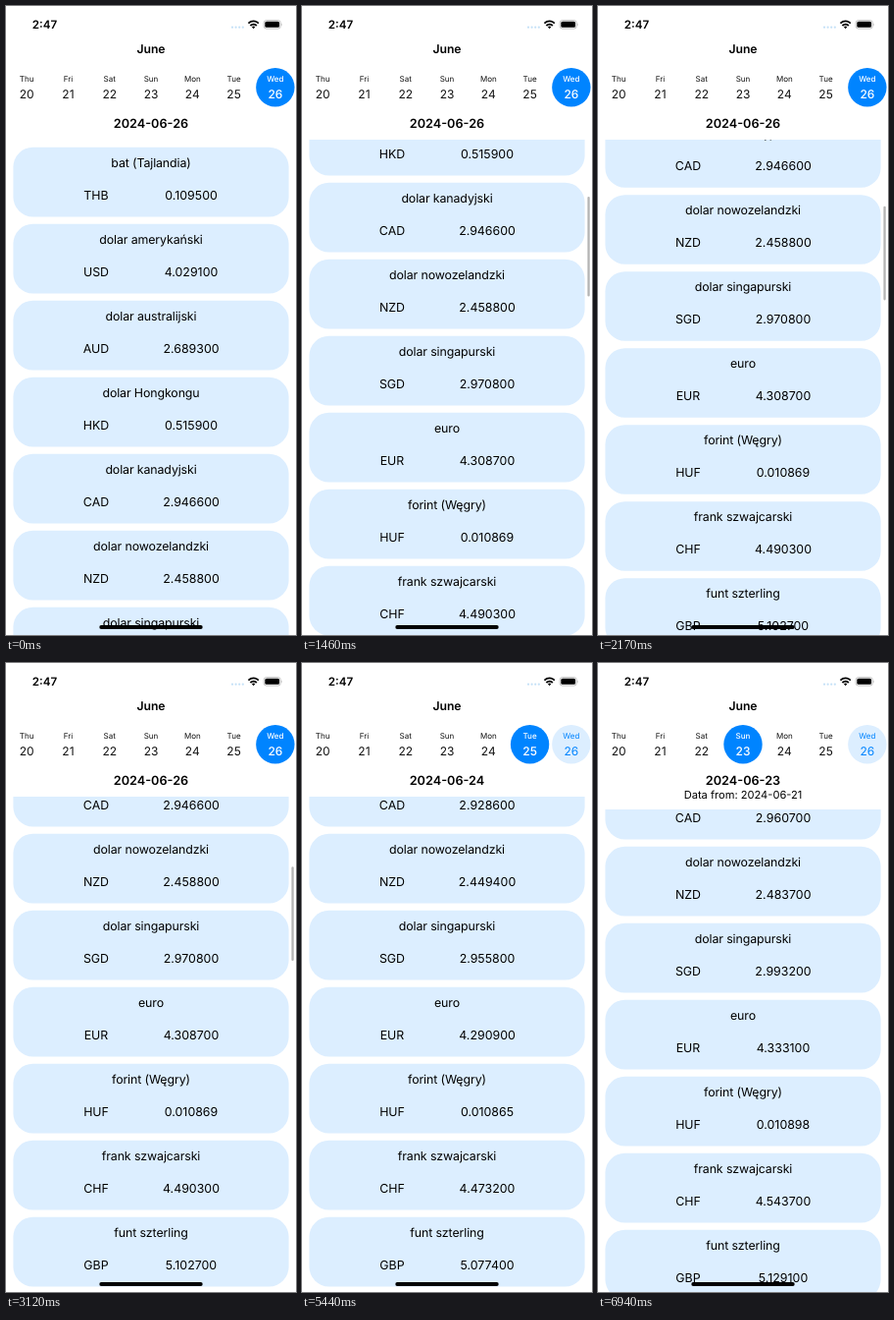
These frames come from a looping animation (296x640 px, 8000 ms). An HTML page:

```html
<!DOCTYPE html>
<html lang="en">
<head>
<meta charset="utf-8">
<title>Exchange rates</title>
<style>
  html, body { margin: 0; width: 100%; height: 100%; overflow: hidden; background: #fff; }
  svg { display: block; width: 100%; height: 100%; }
  text {
    font-family: Inter, Roboto, sans-serif; font-size: 12.4px; text-anchor: middle;
    fill: #000; text-rendering: geometricPrecision;
  }
  .bold { font-weight: 600; }
  .title { letter-spacing: -.12px; }
  .name { font-size: 8px; }
  .num { font-size: 12px; }
</style>
</head>
<body>
<svg id="stage" viewBox="0 0 296 640">
  <defs>
    <clipPath id="view"><rect id="viewRect" width="296" height="640"/></clipPath>
  </defs>
  <rect width="296" height="640" fill="#fff"/>
  <g clip-path="url(#view)"><g id="list"></g></g>
  <rect id="bar" x="291.4" width="2.3" rx="1.15" fill="#b4b4b4"/>

  <text class="bold" x="39.5" y="23" style="font-size:11.6px">2:47</text>
  <g fill="#c5e1f7">
    <circle cx="231" cy="21.7" r="1.1"/><circle cx="234.6" cy="21.7" r="1.1"/>
    <circle cx="238.2" cy="21.7" r="1.1"/><circle cx="241.8" cy="21.7" r="1.1"/>
  </g>
  <g fill="none" stroke="#000" stroke-width="1.8">
    <path d="M247.4 17.6a7.4 7.4 0 0 1 10.4 0"/>
    <path d="M249.4 20a4.6 4.6 0 0 1 6.4 0"/>
  </g>
  <path d="M250.9 21.3a2.4 2.4 0 0 1 3.4 0l-1.7 1.9z"/>
  <rect x="263.1" y="14.6" width="17.2" height="8.4" rx="2.6" fill="none" stroke="#b0b0b0" stroke-width=".8"/>
  <rect x="264.3" y="15.8" width="14.8" height="6" rx="1.6"/>
  <path d="M281.2 17.4q1.3 1.4 0 2.8z" fill="#b0b0b0"/>

  <text class="bold" x="148" y="48" style="font-size:12.2px">June</text>
  <g id="week"></g>
  <text id="date" class="bold" x="148" y="123.5" style="font-size:12.7px"></text>
  <text id="note" x="148" y="138" style="font-size:11.1px">Data from: 2024-06-21</text>
  <rect x="95.3" y="630.1" width="105.4" height="3.8" rx="1.9"/>
</svg>
<script>
const LOOP = 8000, PITCH = 78, LIST_TOP = 143.8, TODAY = 26;
const BLUE = '#0084ff', PALE = '#dceeff';

const currencies = [
  ['bat (Tajlandia)', 'THB'], ['dolar amerykański', 'USD'], ['dolar australijski', 'AUD'],
  ['dolar Hongkongu', 'HKD'], ['dolar kanadyjski', 'CAD'], ['dolar nowozelandzki', 'NZD'],
  ['dolar singapurski', 'SGD'], ['euro', 'EUR'], ['forint (Węgry)', 'HUF'],
  ['frank szwajcarski', 'CHF'], ['funt szterling', 'GBP']
];
const firstRates = [0.1095, 4.0291, 2.6893, 0.5159];
// Rates from CAD onward for each day.
const rates = {
  26: [2.9466, 2.4588, 2.9708, 4.3087, 0.010869, 4.4903, 5.1027],
  25: [2.9286, 2.4494, 2.9558, 4.2909, 0.010865, 4.4732, 5.0774],
  24: [2.9447, 2.4665, 2.9745, 4.3120, 0.010882, 4.5084, 5.1032],
  23: [2.9607, 2.4837, 2.9932, 4.3331, 0.010898, 4.5437, 5.1291]
};
const taps = [[3950, 25], [5440, 24], [6620, 23]];
const ticks = [0, 500, 610, 730, 850, 980, 1090, 1210, 1320, 1460, 1570, 1690, 1810,
  1930, 2050, 2170, 2280, 2400, 2530, 2690, 2990, 3120];

const $ = id => document.getElementById(id);
function add(parent, tag, attrs, content = '') {
  const el = document.createElementNS('http://www.w3.org/2000/svg', tag);
  for (const key in attrs) el.setAttribute(key, attrs[key]);
  el.textContent = content;
  return parent.appendChild(el);
}

const values = currencies.map(([name, code], i) => {
  const y = LIST_TOP + i * PITCH;
  add($('list'), 'rect', { x: 7.4, y, width: 281.2, height: 70.6, rx: 20, fill: PALE });
  add($('list'), 'text', { x: 148, y: y + 20, class: 'title' }, name);
  add($('list'), 'text', { x: 92, y: y + 52.8 }, code);
  return add($('list'), 'text', { x: 189, y: y + 52.8 });
});

const days = ['Thu', 'Fri', 'Sat', 'Sun', 'Mon', 'Tue', 'Wed'].map((name, i) => {
  const x = (i + 0.5) * 296 / 7, group = add($('week'), 'g', {});
  return {
    number: 20 + i,
    group,
    disc: add(group, 'circle', { cx: x, cy: 82.8, r: 19.7 }),
    labels: [
      add(group, 'text', { x, y: 76.7, class: 'name' }, name),
      add(group, 'text', { x, y: 94, class: 'num' }, 20 + i)
    ]
  };
});

// Finger drag, then momentum with exponential slowdown.
function scrollAt(t) {
  if (t < 500) return 0;
  if (t < 980) return 5 + 91 * ((t - 500) / 350) ** 1.1;
  if (t < 3120) return 362.6 - 86.6 * Math.exp(-0.002 * (t - 1460));
  return 360;
}

function drawBar(t, scroll) {
  // The thumb shrinks as more rows load.
  const ratio = t < 1090 ? 0.323 : t < 1580 ? 0.21 : 0.198;
  $('bar').setAttribute('y', 136 + scroll * ratio);
  $('bar').setAttribute('height', ratio * 484);
  $('bar').setAttribute('visibility', t >= 500 && t < taps[0][0] ? 'visible' : 'hidden');
}

function drawDays(selected, opacity) {
  for (const { number, group, disc, labels } of days) {
    const active = number === selected, today = number === TODAY;
    disc.setAttribute('fill', active ? BLUE : today ? PALE : 'none');
    group.setAttribute('opacity', active ? opacity : 1);
    for (const label of labels) {
      label.style.fill = active ? '#fff' : today ? BLUE : '#111';
      label.style.fontWeight = active ? 500 : 400;
    }
  }
}

function render(time) {
  const t = time % LOOP;
  const scroll = scrollAt(ticks.filter(tick => tick <= t).pop());

  // The heading changes first; the selected day and rates follow.
  let heading = TODAY, selected = TODAY, opacity = 1;
  for (const [start, day] of taps) {
    if (t >= start) heading = day;
    if (t >= start + 120) {
      selected = day;
      opacity = t < start + 230 ? 0.7 : t < start + 320 ? 0.9 : 1;
    }
  }
  const shift = selected === 23 ? 13 : 0;

  $('date').textContent = `2024-06-${heading}`;
  $('note').setAttribute('visibility', shift ? 'visible' : 'hidden');
  $('viewRect').setAttribute('y', 136 + shift);
  $('list').setAttribute('transform', `translate(0 ${shift - scroll})`);
  [...firstRates, ...rates[selected]].forEach((rate, i) => {
    values[i].textContent = rate.toFixed(6);
  });
  drawBar(t, scroll);
  drawDays(selected, opacity);
}

const begin = performance.now();
function loop() {
  render(performance.now() - begin);
  requestAnimationFrame(loop);
}
loop();
</script>
</body>
</html>
```
